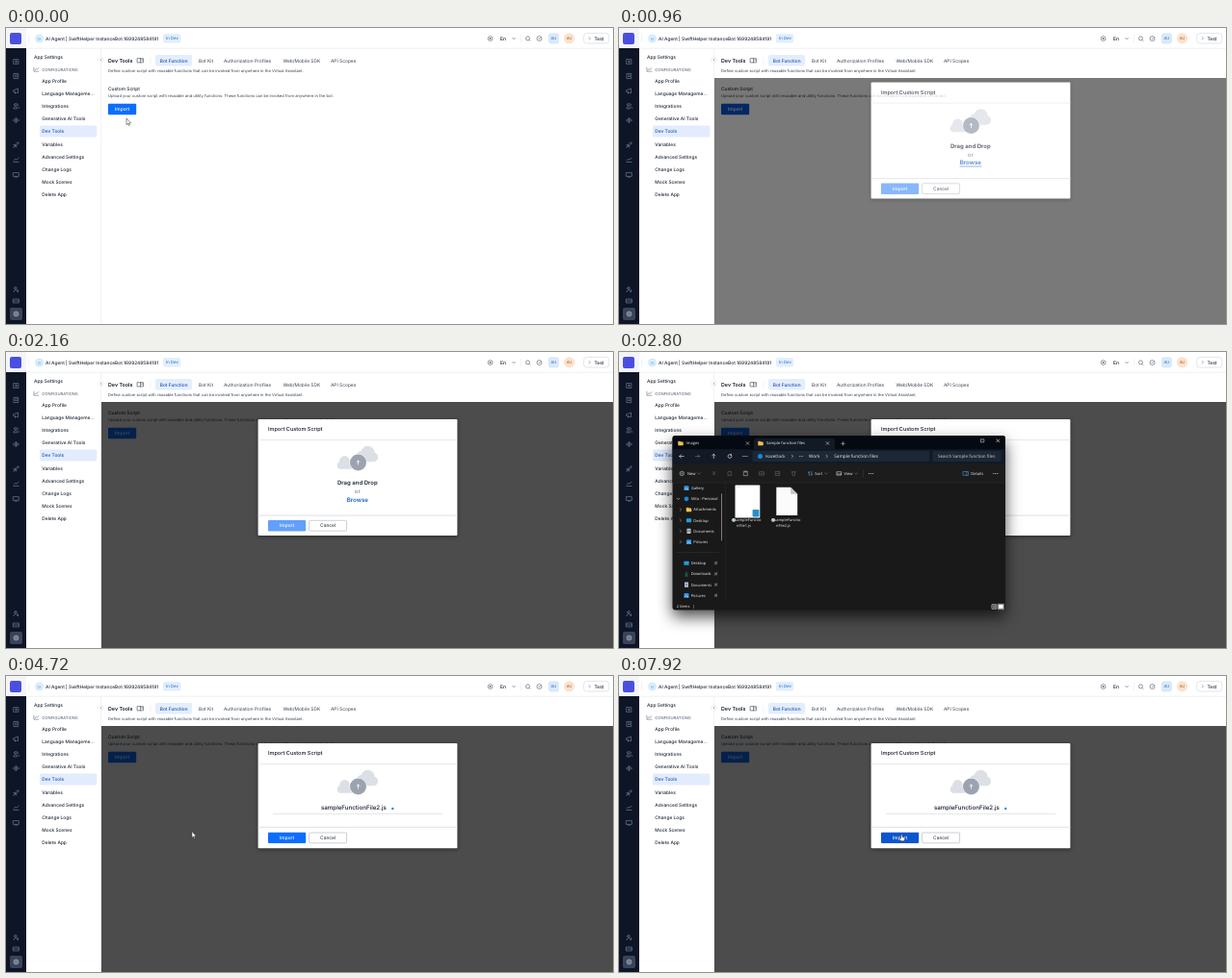
An HTML page that plays this animation: 630x308 px, repeating every 8 s.

```html
<!DOCTYPE html>
<html lang="en">
<head>
<meta charset="utf-8">
<title>Import custom script</title>
<style>
html, body { margin: 0; width: 100%; height: 100%; overflow: hidden; background: #fff; }
svg { display: block; width: 630px; height: 308px; }
text { font-family: Inter, sans-serif; white-space: pre; text-rendering: geometricPrecision; }
.win text { font-family: "Open Sans", "Noto Sans", sans-serif; }
.win { filter: drop-shadow(0 7px 8px rgba(0,0,0,.7)); }
.card { filter: drop-shadow(0 1px 2px rgba(0,0,0,.45)); }
</style>
</head>
<body>
<svg id="stage" viewBox="0 0 630 308"></svg>
<script>
const LOOP = 8000, STEP = 80;
const INK = '#1f2937', GREY = '#475569', BLUE = '#0d6efd', HOVER = '#0b55d0', LINE = '#4b5563';

// y is the middle of the capitals
const text = (x, y, size, s, fill = INK, weight = 400, more = '') =>
  `<text x="${x}" y="${(y + size * .36).toFixed(2)}" font-size="${size}" fill="${fill}" font-weight="${weight}" ${more}>${s}</text>`;
const mid = (x, y, size, s, fill, weight, more = '') =>
  text(x, y, size, s, fill, weight, 'text-anchor="middle" ' + more);
const rect = (x, y, w, h, fill, r = 0, more = '') =>
  `<rect x="${x}" y="${y}" width="${w}" height="${h}" rx="${r}" fill="${fill}" ${more}/>`;
const disc = (x, y, r, fill, more = '') => `<circle cx="${x}" cy="${y}" r="${r}" fill="${fill}" ${more}/>`;
const ring = (x, y, r, c, w = .6) => disc(x, y, r, 'none', `stroke="${c}" stroke-width="${w}"`);
const line = (d, c, w = .6) =>
  `<path d="${d}" fill="none" stroke="${c}" stroke-width="${w}" stroke-linecap="round" stroke-linejoin="round"/>`;
const shape = (d, fill, more = '') => `<path d="${d}" fill="${fill}" ${more}/>`;
const icon = (x, y, d, c, w) => `<g transform="translate(${x} ${y})">${line(d, c, w)}</g>`;
const group = (id, body, more = '') => `<g id="${id}" ${more}>${body}</g>`;
const DOWN = 'M-1.3-.6L0 .7 1.3-.6', RIGHT = 'M-.6-1.3L.7 0-.6 1.3', CROSS = 'M-1.4-1.4L1.4 1.4M1.4-1.4L-1.4 1.4';
const box = (a, b) => `M${-a}${-b}H${a}V${b}H${-a}Z`;

function sidebar() {
  const c = '#818c9f';
  const marks = [
    [35, box(2.4, 2.4) + 'M-1 0H1M0-1V1'],
    [50, box(2.2, 2.6) + 'M-1-1H1M-1 .5H1'],
    [65.5, 'M-2.6-.8L2-2.4V2.2L-2.6 1ZM-1 1.4V2.8'],
    [81, 'M-2.7 2.5C-2.7 0 1 0 1 2.5ZM-2-1.3a1.2 1.2 0 1 0 2.4 0a1.2 1.2 0 1 0-2.4 0M1.4-2.4q1.6 1 0 2.2M2 .6q1 .6 1 1.9'],
    [96, 'M-2.6-.5V.8M-1.3-1.8V2M0-2.6V2.6M1.3-1.6V1.6M2.6-.5V.6'],
    [121.5, 'M-2.5 2.5L-1 .4C0-2 1.5-2.6 2.7-2.6 2.6-1 1.8.4-.4 1ZM-1 .4L-2.6 0M-.4 1L0 2.6'],
    [137, 'M-2.7 2.5H2.7M-2.4 .8L-.8-.6.6.3 2.5-2'],
    [152.5, box(2.8, 1.9) + 'M-1 2.7H1'],
    [272, 'M-2.6 2.6C-2.6 0 1.6 0 1.6 2.6M-1.8-1.2a1.3 1.3 0 1 0 2.6 0a1.3 1.3 0 1 0-2.6 0M2 .6V2.6'],
    [284, box(2.8, 2) + 'M-2.8 0H2.8']
  ];
  return rect(0, 0, 21, 308, '#0d1526') + rect(0, 0, 21, 21, '#f3f5fa') +
    rect(4, 5, 12, 12, '#4a4fe0', 2) +
    marks.map(([y, d]) => icon(10.5, y, d, c)).join('') +
    rect(4, 291, 13, 13, '#39445a', 2) + ring(10.5, 297.5, 2.4, '#e5e9f0') + ring(10.5, 297.5, .9, '#e5e9f0');
}

function topBar() {
  const c = LINE;
  return rect(21, 20.8, 609, .6, '#e2e6ec') + rect(23, 7, .5, 8, '#dfe4ea') +
    disc(34.5, 11, 3.9, '#e3f1fd', 'stroke="#a9d3f5" stroke-width=".5"') + icon(34.5, 11, 'M-1.2 1V-.6H1.2V1Z', '#58a6e0', .5) +
    text(41, 11, 4.83, 'AI Agent | SwiftHelper InstanceBot 1699248584191', INK, 500) +
    rect(163, 6, 18.3, 9.4, '#e1effe', 2) + text(166, 10.7, 4.3, 'In Dev', '#1f63c9') +
    ring(502.6, 11, 2.4, c) + shape('M501.9 9.8V12.2L503.9 11Z', c) +
    text(513, 10.8, 5.1, 'En', INK, 500) + icon(527, 11, DOWN, c) + rect(534.3, 7, .5, 8, '#dfe4ea') +
    ring(541.5, 10.8, 2, c) + icon(543.2, 12.6, 'M0 0L.8.8', c) +
    ring(553.5, 11, 2.5, c) + icon(553.5, 11, 'M-.8 0L0 .8 1-.8', c, .5) +
    rect(562.8, 5.2, 11.2, 11.2, '#d9e9fc', 3) + mid(568.4, 10.8, 4, 'AU', '#255ca8') +
    disc(584.5, 10.8, 5.6, '#fbe2cd') + mid(584.5, 10.8, 4, 'AU', '#95562a') +
    rect(599.7, 5.4, 26.2, 10.6, '#fff', 3, 'stroke="#cfd6e0" stroke-width=".6"') +
    icon(605.8, 10.8, RIGHT, c, .5) + text(610.5, 10.8, 4.9, 'Test', INK, 500);
}

function menu() {
  const items = ['App Profile', 'Language Manageme...', 'Integrations', 'Generative AI Tools', 'Dev Tools',
    'Variables', 'Advanced Settings', 'Change Logs', 'Mock Scenes', 'Delete App'];
  return rect(98, 21, .6, 287, '#e8ebf0') +
    text(29, 30.7, 4.88, 'App Settings', INK, 500) +
    icon(31.3, 43.2, 'M-2.4-2V2H2.6M-1.4 .8L0-.6.8.2 2.4-1.6', GREY, .5) +
    text(37.3, 43.2, 4.2, 'CONFIGURATIONS', GREY) +
    rect(35, 101.6, 59.3, 12, '#e2ecfe', 1.5) +
    items.map((s, i) => text(37.3, 55.1 + i * 13.13, 4.85, s, i === 4 ? '#1c4fb0' : INK, 500)).join('') +
    disc(98.4, 33, 3, '#fff', 'stroke="#e2e6ec" stroke-width=".5"') + icon(98.4, 33, 'M.6-1.2L-.6 0 .6 1.2', LINE, .5);
}

function page() {
  const tabs = [[200, 'Bot Kit'], [226, 'Authorization Profiles'], [287.5, 'Web/Mobile SDK'], [337, 'API Scopes']];
  return text(106, 33.8, 5.35, 'Dev Tools', '#111827', 600) +
    icon(139.5, 33.8, box(3, 2.1) + 'M0-2.1V2.1M1-.6H2', '#374151') + rect(149.7, 30.5, .5, 7, '#dfe4ea') +
    rect(155, 28, 38.2, 11.6, '#e3eefd', 2) + text(159.8, 33.8, 4.8, 'Bot Function', '#1c4fb0', 500) +
    tabs.map(([x, s]) => text(x, 33.8, 4.85, s, '#374151')).join('') +
    text(106, 44.6, 4.13, 'Define custom script with reusable functions that can be invoked from anywhere in the Virtual Assistant.', '#374151') +
    text(106, 63, 4.87, 'Custom Script', INK, 500) +
    text(106, 70.1, 4.14, 'Upload your custom script with reusable and utility functions. These functions can be invoked from anywhere in the bot.', '#374151') +
    rect(106, 78.7, 29.2, 11.5, BLUE, 1, 'id="open"') + mid(120.6, 84.4, 4.85, 'Import', '#fff', 500);
}

function buttons(y, id, fill) {
  return rect(272, y, 39.2, 11.4, fill, 1, `id="${id}"`) + mid(291.6, y + 5.7, 4.85, 'Import', '#fff', 500) +
    rect(314.6, y + .3, 39, 10.8, '#fff', 1, 'stroke="#a9b1bd" stroke-width=".6"') +
    mid(334.1, y + 5.7, 4.9, 'Cancel', INK);
}

function modal() {
  const cloud = '#dcdfe5';
  const frame = (h, foot) => rect(261.6, 70, 206.8, h, '#fff', 1, 'class="card"') + rect(261.6, 91.2, 206.8, .7, '#dde1e7') +
    rect(261.6, foot, 206.8, 1, '#dde0e5');
  const head = text(272, 80.3, 5.55, 'Import Custom Script', '#111827', 500) +
    disc(375.5, 105, 7.2, cloud) + disc(381.3, 109.5, 4.8, cloud) + disc(369, 108, 5, cloud) + rect(367, 107, 15, 7.3, cloud, 2) +
    disc(351.5, 113.5, 5.4, cloud) + disc(347.5, 118, 3.8, cloud) + rect(346, 115, 14, 6.8, cloud, 2) +
    disc(365.5, 115, 9, '#fff') + disc(365.5, 115, 8.5, '#9ba3b0') + icon(365.5, 115, 'M0 2.1V-2M-1.5-.5L0-2 1.5-.5', '#fff', .8);
  const empty = frame(121, 169.6) + head +
    mid(364.8, 135.9, 6, 'Drag and Drop', INK, 600) + mid(364.8, 145, 6, 'or', '#6b7280') +
    mid(364.8, 153.7, 6.2, 'Browse', '#1a5fc4', 600) + rect(353.4, 157.2, 23, .6, '#1a5fc4', 0, 'id="under"') +
    buttons(175, 'off', '#62a0fb');
  const loaded = frame(109.3, 156.8) + head +
    text(327, 137.2, 6.2, 'sampleFunctionFile2.js', '#111827', 500) + disc(401.3, 138, 1.2, '#3d7fe0') +
    rect(277, 143.2, 176, .6, '#d3d7dd') + buttons(162.7, 'send', BLUE);
  return rect(99, 52, 531, 256, 'rgba(0,0,0,.7)') +
    group('sheet', group('empty', empty) + group('loaded', loaded));
}

const folder = (x, y, c = '#f2c14e') =>
  rect(x - 2.7, y - 2.3, 2.8, 2, '#d9982b', .5) + rect(x - 2.7, y - 1.6, 5.4, 3.9, c, .5);
const tile = (x, y, c = '#2f95e8') =>
  rect(x - 2.5, y - 2.3, 5, 4.6, c, .7) + icon(x, y, 'M-1.8 1.5L-.4 0 .5.8 1.8 1.5', '#fff', .5);
const paper = (x, y) => rect(x - 2, y - 2.6, 4, 5.2, '#b7c4d3', .5) + icon(x, y, 'M-1-.8H1M-1 .4H1', '#47566b', .5);
const arrowDown = (x, y) => icon(x, y, 'M0-2V.9M-1.1-.2L0 .9 1.1-.2M-1.6 2H1.6', '#1f9d85', .6);
const screen = (x, y) => rect(x - 2.6, y - 2, 5.2, 4, '#1f9de0', .5);

function explorer() {
  const w = '#f2f2f2', dim = '#777', bar = '#121a26', field = '#1d2735';
  const f = (x, y, s, size = 4, c = w) => text(x, y, size, s, c);
  const dots = (xs, y, r) => xs.map(x => disc(x, y, r, w)).join('');
  const tree = [[164, 'Attachments', folder], [175.2, 'Desktop', screen], [186.4, 'Documents', paper], [197.6, 'Pictures', tile]];
  const pins = [[219.8, 'Desktop', screen], [231, 'Downloads', arrowDown], [242.2, 'Documents', paper], [253.4, 'Pictures', tile]];
  const name = (x, n) => mid(x + .8, 174.9, 3.96, 'sampleFunctio', w) + mid(x - 3.5, 180.8, 3.96, `nFile${n}.js`, w) +
    disc(x - 14, 174.8, 1.9, '#e6f3e8') + icon(x - 14, 174.8, 'M-.9 0L-.2.7 1-.7', '#25883f', .6);
  return rect(55.5, 87, 345.5, 181.6, '#191919', 3) +
    shape('M55.5 102V90Q55.5 87 58.5 87H398Q401 87 401 90V102Z', '#050a12') +
    shape('M140 101.3V92.5Q140 90 142.5 90H221.5Q224 90 224 92.5V101.3Z', bar) +
    rect(55.5, 101.2, 345.5, 15, bar) + rect(55.5, 116.2, 345.5, 19.8, '#1c1c1c') + rect(55.5, 135.8, 345.5, .5, '#303030') +
    folder(64, 95) + f(69.5, 95, 'Images', 4.1) + icon(133.5, 95, CROSS, w, .5) +
    folder(147, 95) + f(153, 95, 'Sample function files', 4.12) + icon(216.5, 95, CROSS, w, .5) +
    icon(232.5, 95.3, 'M-1.7 0H1.7M0-1.7V1.7', w, .5) +
    icon(377.3, 92.3, box(1.5, 1.5), w, .5) + icon(393.3, 92.3, CROSS, w, .6) +
    icon(65, 108.5, 'M2.2 0H-2.2M-.6-1.7L-2.2 0-.6 1.7', w) + icon(81.5, 108.5, 'M-2.2 0H2.2M.6-1.7L2.2 0 .6 1.7', dim) +
    icon(98.3, 108.5, 'M0 2.2V-2.2M-1.7-.6L0-2.2 1.7-.6', w) + ring(115, 108.5, 1.9, w) + icon(116.6, 107.2, 'M0-1V0H-1', w, .5) +
    dots([128.9, 130.9, 132.9], 108.5, .55) +
    rect(138.5, 103.1, 183.5, 10.8, field, 1.2) + rect(325.5, 103.1, 71, 10.8, field, 1.2) +
    disc(146.5, 108.5, 2.5, '#1688dc') + f(152, 108.5, 'HazeDock', 4.4) + icon(180, 108.5, RIGHT, w, .5) +
    dots([187.4, 189, 190.6], 108.5, .45) +
    f(197, 108.5, 'Work', 4.65) + icon(215.7, 108.5, RIGHT, w, .5) + f(223.3, 108.5, 'Sample function files', 4.7) +
    f(331, 108.5, 'Search Sample function files', 4.53, '#d5d5d5') +
    ring(65.3, 126.4, 2.2, w, .5) + icon(65.3, 126.4, 'M-1 0H1M0-1V1', '#4ab0f5', .5) + f(71, 126.5, 'New', 4.1) + icon(83, 126.5, DOWN, '#aaa', .4) +
    icon(98.6, 126.4, 'M-1.5-2L1 1.4M1.5-2L-1 1.4', dim, .5) + icon(115, 126.4, box(1.6, 2), dim, .5) +
    icon(131.5, 126.4, box(1.8, 2.2) + 'M-.8-2.2V-1.3H.8V-2.2', '#cfcfcf', .5) + icon(148.3, 126.4, box(2.3, 1.7) + 'M-1 0H1', dim, .5) +
    icon(164.7, 126.4, box(2, 2) + 'M-.8 0H1', dim, .5) + icon(181.3, 126.4, 'M-2-1.6H2M-1.5-1.6L-1 2.2H1L1.5-1.6', dim, .5) +
    icon(198.6, 126.4, 'M-1.2 2V-2L-2.2-.8M1.2-2V2L2.2.8', '#55b0f0', .6) + f(203.3, 126.5, 'Sort', 4.1) + icon(215, 126.5, DOWN, '#aaa', .4) +
    icon(228.5, 126.4, box(2.2, 1.7) + 'M-2.2 .6H2.2', w, .5) + f(233.5, 126.5, 'View', 4.1) + icon(246, 126.5, DOWN, '#aaa', .4) +
    rect(253.5, 122.5, .4, 8, '#444') + dots([259.6, 261.6, 263.6, 388.9, 390.9, 392.9], 126.5, .5) +
    icon(360, 126.4, box(2.6, 1.9) + 'M.8-1.9V1.9', '#55b0f0', .5) + f(365.3, 126.5, 'Details', 4.1) +
    tile(70, 141.6) + f(75, 141.6, 'Gallery') +
    icon(61.5, 152.8, DOWN, w, .5) + disc(70, 152.8, 2.4, '#1688dc') + f(75, 152.8, 'Mila - Personal') +
    tree.map(([y, s, draw]) => icon(64, y, RIGHT, '#bbb', .5) + draw(72.5, y) + f(77.3, y, s)).join('') +
    rect(60, 208.3, 44, .4, '#3d3d3d') + rect(106, 147, .9, 49.5, '#8a8a8a', .4) + rect(110.5, 136, .4, 124, '#2e2e2e') +
    pins.map(([y, s, draw]) => draw(70, y) + f(74.7, y, s) + icon(100.5, y, 'M-1.3 1.4L-.2.2M-.9-.6L.8 1.1 1-.3 1.6-.8.6-1.7 0-1Z', '#bbb', .5)).join('') +
    rect(157, 138.3, 35.4, 45.6, '#777', 1, 'id="pick"') +
    rect(120.5, 138.5, 25.8, 34, '#fff', .6) + icon(126, 140.6, 'M-3 0H0', '#ccc', .4) + rect(138.6, 163.9, 6.8, 7.6, '#2590c8', .8) +
    shape('M163.3 140.8H178.2L185.2 147.8V170H163.3Z', '#fbfbfb') + shape('M178.2 140.8L185.2 147.8H178.2Z', '#c4c4c4') +
    name(133, 1) + name(174, 2) +
    f(59.8, 265, '2 items') + rect(77.3, 263, .4, 4, '#bbb') +
    group('info', f(81, 265, '1 item selected') + f(112, 265, '385 bytes') + f(137.8, 265, 'Available on this device') + rect(186, 263, .4, 4, '#bbb')) +
    icon(389.7, 265, box(2.3, 2.2) + 'M-1.2-.8H1.2M-1.2 .8H1.2', '#ddd', .7) +
    rect(393, 261.7, 6.8, 6.6, '#8a8a8a', .6) + rect(394.2, 263, 4.4, 3.8, '#fff', .4);
}

const pen = 'stroke="#222" stroke-width=".5" stroke-linejoin="round"';
const arrow = shape('M0 0V6.6L1.5 5.3 2.5 7.5 3.4 7.1 2.5 5H4.6Z', '#fff', pen);
const hand = shape('M-.7.6A.7.7 0 0 1 .7.6V2.6L2.9 3.1Q3.6 3.4 3.4 4.3L2.8 6.7H-.7L-2.4 4.2Q-2.1 3.3-.7 4Z', '#fff', pen);

const stage = document.getElementById('stage');
stage.innerHTML = rect(0, 0, 630, 308, '#fff') + page() + topBar() + menu() + sidebar() +
  group('dialog', modal()) + group('files', explorer(), 'class="win"') +
  group('cursor', group('arrow', arrow) + group('hand', hand));

const $ = id => document.getElementById(id);
const set = (id, key, value) => $(id).setAttribute(key, value);
const show = (id, on) => set(id, 'opacity', +on);

// rows of [time, values...], joined by straight lines
function track(rows, t) {
  const i = rows.findIndex(r => r[0] > t);
  if (i < 0) return rows[rows.length - 1].slice(1);
  if (i === 0) return rows[0].slice(1);
  const a = rows[i - 1], b = rows[i], k = (t - a[0]) / (b[0] - a[0]);
  return a.slice(1).map((v, n) => v + (b[n + 1] - v) * k);
}
const PATH = [[0, 125, 94], [160, 125, 94], [480, 121, 83], [880, 120.5, 82.5], [2160, 334, 178],
  [2480, 366, 152], [2880, 366, 152], [3280, 250, 158], [3600, 180.5, 160], [4640, 180.5, 160],
  [5280, 280, 173], [5520, 291, 170], [5840, 290, 167], [6400, 290, 167], [7200, 292, 166], [7920, 293.3, 165]];
const FADE = [[800, 0], [960, .75], [1040, 1]];
const DROP = [[800, -26], [960, -13.5], [1040, -4], [1120, 0]];
const WINDOW = [[2640, 0], [2720, .6], [2800, 1], [4480, 1], [4560, .5], [4640, 0]];

function draw(t) {
  const within = (a, b) => t >= a && t < b;
  const [x, y] = track(PATH, t);
  const onOpen = within(480, 1200), onBrowse = within(2400, 2720), onSend = t >= 5440;
  set('cursor', 'transform', `translate(${x.toFixed(2)} ${y.toFixed(2)})`);
  show('cursor', !within(880, 2240) && !within(2720, 2960));
  const pointing = onOpen || onBrowse || onSend;
  show('hand', pointing);
  show('arrow', !pointing);
  set('open', 'fill', onOpen ? HOVER : BLUE);
  set('send', 'fill', onSend ? HOVER : BLUE);
  set('dialog', 'opacity', track(FADE, t)[0]);
  set('sheet', 'transform', `translate(0 ${track(DROP, t)[0]})`);
  show('under', t < 1200 || onBrowse);
  const done = t >= 4560;
  show('empty', !done);
  show('loaded', done);
  set('files', 'opacity', track(WINDOW, t)[0]);
  set('pick', 'opacity', t >= 3600 ? 1 : t >= 3440 ? .4 : 0);
  show('info', t >= 3600);
}

const start = performance.now();
function tick() {
  const t = (performance.now() - start) % LOOP;
  draw(Math.floor(t / STEP) * STEP);
  requestAnimationFrame(tick);
}
draw(0);
requestAnimationFrame(tick);
</script>
</body>
</html>
```
